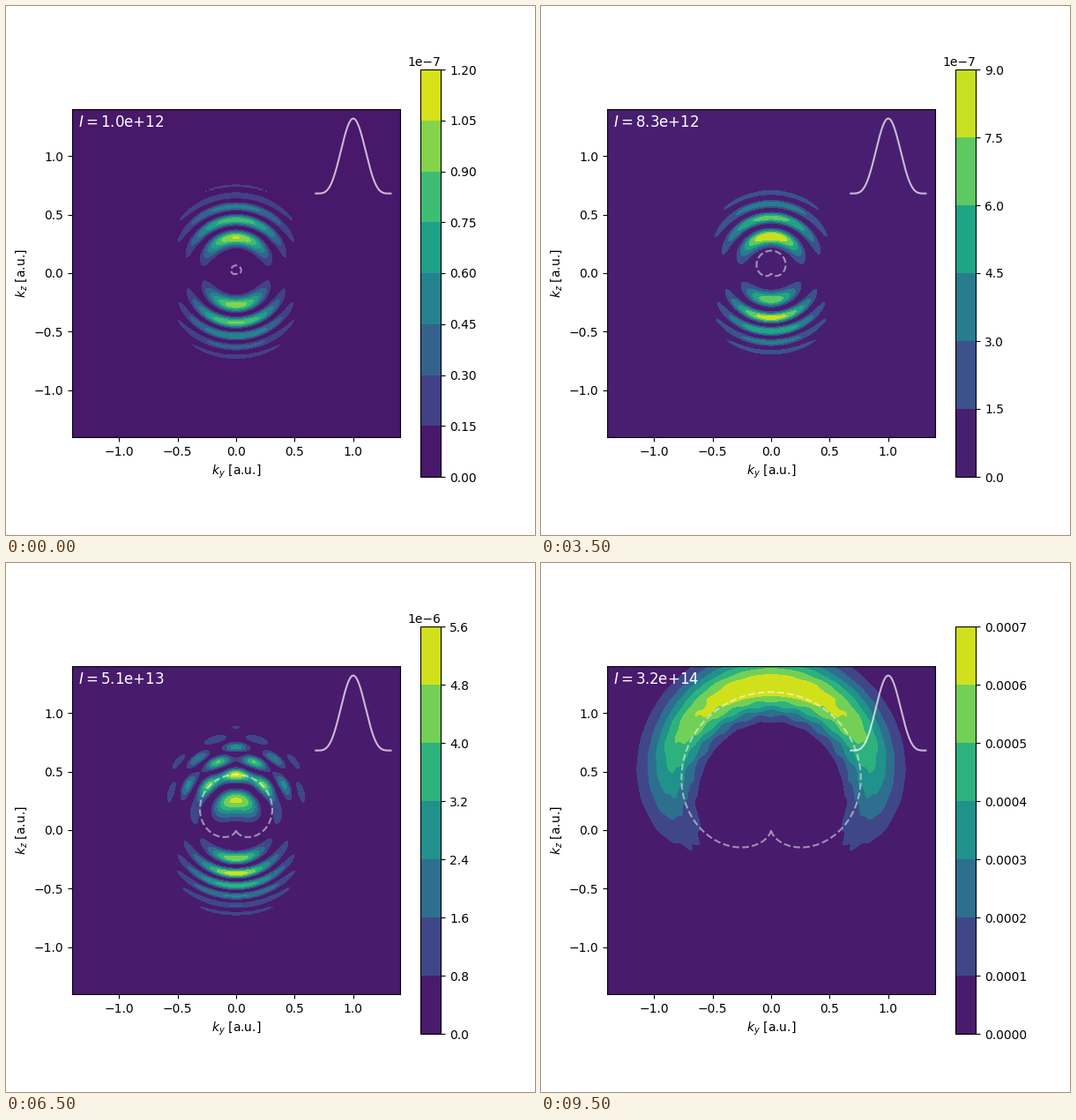
Recreate the animation shown at these times as a matplotlib script. Size 600 px wide and 600 px high, loop 10 s.

```python
import numpy as np
import matplotlib.pyplot as plt
from matplotlib.animation import FuncAnimation

FRAMES, INTERVAL = 20, 500
OMEGA = 45.5634 / 800          # 800 nm carrier, atomic units
IP = 0.5                       # ionisation potential
ATOMIC_INTENSITY = 3.50945e16  # W/cm^2
K_MAX, K_POINTS, T_POINTS = 1.4, 201, 600

intensities = np.logspace(12, 14.5, FRAMES)
k = np.linspace(-K_MAX, K_MAX, K_POINTS)
ky, kz = np.meshgrid(k, k)
# Momentum-space ground state of hydrogen
ground = 2 * np.sqrt(2) / np.pi / (ky**2 + kz**2 + 1) ** 2
phase = np.linspace(-np.pi, np.pi, T_POINTS, endpoint=False)


def peak_potential(intensity):
    return np.sqrt(intensity / ATOMIC_INTENSITY / 2) / OMEGA


def potential(phi, peak):
    """Single-cycle circular pulse with a cos^2 envelope."""
    envelope = peak * (1 + np.cos(phi)) / 2
    return envelope * np.sin(phi), envelope * np.cos(phi)


def distribution(peak):
    """Photoelectron momentum distribution, strong-field approximation."""
    c, s, s2 = np.cos(phase), np.sin(phase), np.sin(2 * phase)
    pot_y, pot_z = potential(phase, peak)
    time = phase / OMEGA
    drift_y = -peak * (c + np.cos(2 * phase) / 4) / 2 / OMEGA
    drift_z = peak * (s + phase / 2 + s2 / 4) / 2 / OMEGA
    quiver = peak**2 * (1.5 * phase + 2 * s + s2 / 4) / 8 / OMEGA

    # The Volkov phase factorises into a ky part and a kz part
    column = k[:, None]
    wave_y = np.exp(1j * (column**2 / 2 * time - column * drift_y))
    wave_z = np.exp(1j * (column**2 / 2 * time - column * drift_z
                          + quiver + IP * time))
    sum_y = (wave_z * pot_y) @ wave_y.T
    sum_z = (wave_z * pot_z) @ wave_y.T
    dt = 2 * np.pi / OMEGA / T_POINTS
    return np.abs(ground * (ky * sum_y + kz * sum_z) * dt) ** 2


fig = plt.figure(figsize=(6, 6), dpi=100)


def draw(frame):
    fig.clear()
    ax = fig.add_subplot()
    intensity = intensities[frame]
    peak = peak_potential(intensity)

    filled = ax.contourf(k, k, distribution(peak))
    fig.colorbar(filled, ax=ax)

    phi = np.linspace(-np.pi, np.pi, 400)
    ax.plot(*potential(phi, peak), "--", color="white", alpha=0.5)
    ax.plot(1 + 0.32 * phi / np.pi, 0.68 + 0.64 * np.cos(phi / 2) ** 4,
            color="white", alpha=0.7)
    ax.text(-1.35, 1.25, f"$I=${intensity:.1e}", color="white", fontsize=12)

    ax.set(xlim=(-K_MAX, K_MAX), ylim=(-K_MAX, K_MAX), aspect="equal",
           xlabel="$k_y$ [a.u.]", ylabel="$k_z$ [a.u.]")
    return []


animation = FuncAnimation(fig, draw, frames=FRAMES, interval=INTERVAL,
                          repeat=True)
plt.show()
```
